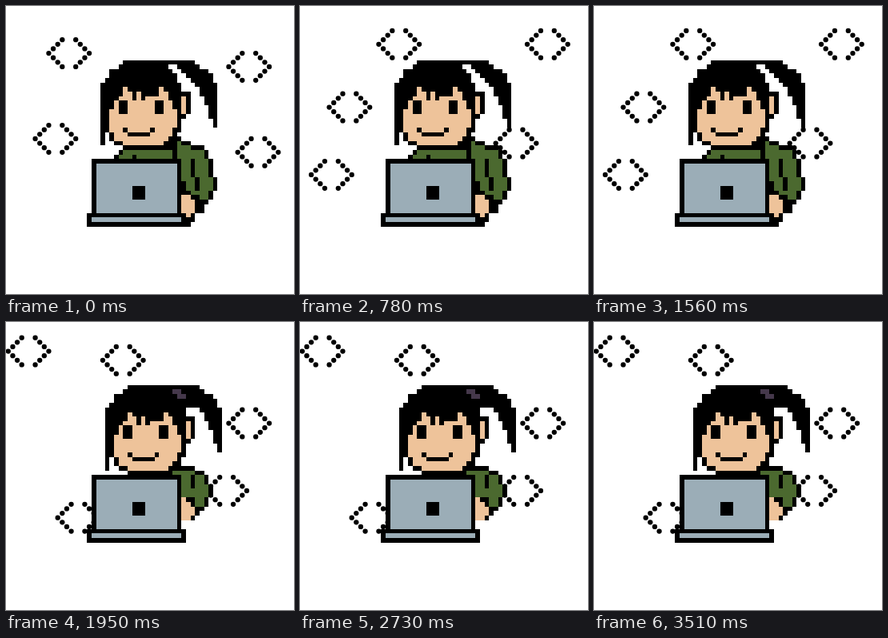
Animation of 360x360 px, one loop 3900 ms. Source, as an HTML page:

```html
<!DOCTYPE html>
<html lang="en">
<head>
<meta charset="utf-8">
<title>Coding</title>
<style>
  html, body { margin: 0; width: 100%; height: 100%; overflow: hidden; background: #fff; }
  svg { display: block; width: 100vw; height: 100vh; }
</style>
</head>
<body>
<svg id="stage" viewBox="0 0 64 64" shape-rendering="crispEdges"></svg>
<script>
const INK = '#000', SKIN = '#eec39a', GREEN = '#4b692f', STEEL = '#9badb7', BAND = '#45384b';
const STEP = 390;
const ORDER = ['rest', 'dip', 'tall', 'dip', 'tall', 'low', 'tall', 'low', 'tall', 'low'];

const shape = (d, fill = INK) => `<path d="${d}" fill="${fill}"/>`;
const box = (x, y, w, h, fill) => shape(`M${x} ${y}h${w}v${h}h${-w}z`, fill);
const dot = (x, y) => `<circle cx="${x + .5}" cy="${y + .5}" r=".56" shape-rendering="auto"/>`;

// A pair of angle brackets, seven dots tall
function brackets([x, y]) {
  let out = '';
  for (let r = 0; r < 7; r++) {
    const d = Math.abs(r - 3);
    out += dot(x + d, y + r) + dot(x + 9 - d, y + r);
  }
  return out;
}

const bodyUp =
  shape('M24 34v-1h1v-1h1v-1h12v-2h1v1h2v1h3v1h1v2h1v4h1v3h-1v2h-1v1h-1v2h-2v2h-1v1H24z') +
  shape('M25 34v-1h1v-1h11v2z', GREEN) +
  shape('M38 30h1v1h2v1h3v2h1v4h1v3h-1v2h-2v-1h-2v-1h-2v-7h-1z', GREEN) +
  box(28, 33, 1, 1) + box(41, 34, 1, 4) + box(42, 38, 1, 3) + box(39, 39, 1, 2) +
  shape('M39 42h2v1h1v3h-1v1h-2z', SKIN);

const bodyDown =
  shape('M35 34v-2h7v1h2v1h1v2h1v3h-1v2h-1v1h-1v1h-1v1h-3v-10z') +
  shape('M36 34v-1h6v1h2v2h1v3h-1v2h-2v-2h-3v-5z', GREEN) +
  box(41, 34, 1, 3) +
  shape('M39 39h1v1h1v1h1v2h-1v1h-2z', SKIN);

const hair = shape('M26 12H42v1h1v1h2v1h1v2h1v10h-1v-2h-1v-3h-1v-2h-1v-2h-1v-1h-3v2h2v5h-1v1h-1v3' +
  'h-1v3h-2v1H26v-1h-2v-1h-1v-2h-1v3h-1V17h1v-1h1v-2h2v-1h1z');

const face =
  shape('M23 28V23H24V21H25V20H26V18H27V19H28V21H29V19H30V21H31V20H34V18H35V19H36V21H37V23H38V27' +
    'H37V29H36V30H35V31H26V30H24V28z', SKIN) +
  box(39, 20, 1, 4, SKIN) +
  box(25, 21, 2, 3) + box(33, 21, 2, 3) +
  box(26, 27, 1, 1) + box(27, 28, 5, 1) + box(32, 27, 1, 1);

const headUp = hair + shape('M36 13h2v1h1v1h1v1h1v1h1v1h-3v-1h-1v-2h-1v-1h-1z', '#fff') + face;
const headDown = `<g transform="translate(1 2)">${hair}${box(36, 13, 2, 1, BAND)}${box(37, 14, 2, 1, BAND)}${face}</g>`;

const laptop =
  box(19, 34, 20, 13) + box(20, 35, 18, 11, STEEL) + box(28, 40, 3, 3) +
  box(18, 46, 22, 3) + box(19, 47, 20, 1, STEEL);

const up = bodyUp + headUp + laptop;
const down = bodyDown + headDown + laptop;

const scenes = {
  rest: [up, [9, 7], [49, 10], [6, 26], [51, 29]],
  dip: [down, [10, 3], [51, 6], [5, 22], [47, 26]],
  tall: [up, [17, 5], [50, 5], [6, 19], [2, 34], [43, 27]],
  low: [down, [0, 3], [21, 5], [49, 19], [44, 34], [11, 40]]
};

const stage = document.getElementById('stage');
stage.innerHTML = Object.entries(scenes).map(([name, [figure, ...spots]]) =>
  `<g id="${name}" visibility="hidden">${spots.map(brackets).join('')}${figure}</g>`).join('');

const start = performance.now();
let shown = null;

function draw(now) {
  const t = Math.max(0, now - start);
  const next = document.getElementById(ORDER[Math.floor(t / STEP) % ORDER.length]);
  if (next !== shown) {
    if (shown) shown.setAttribute('visibility', 'hidden');
    next.setAttribute('visibility', 'visible');
    shown = next;
  }
  requestAnimationFrame(draw);
}
draw(start);
</script>
</body>
</html>
```
